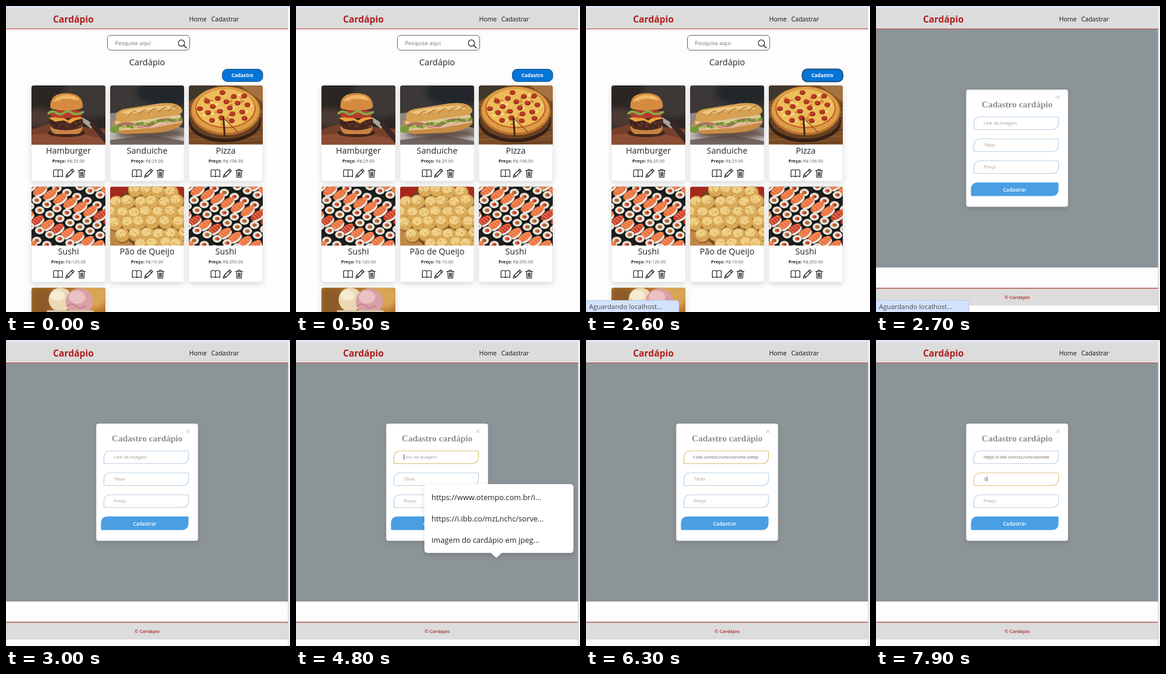
Recreate the animation shown at these times as an HTML page. Size 480 by 516 pixels, loop 8000 ms.

```html
<!DOCTYPE html>
<html lang="pt-BR">
<head>
<meta charset="utf-8">
<title>Cardápio</title>
<style>
  html, body { margin: 0; width: 480px; height: 516px; overflow: hidden; background: #fff; }
  svg { display: block; font-family: "Open Sans", "Noto Sans", sans-serif; }
  .mid { text-anchor: middle; }
  .form { font-family: "Liberation Sans", Arial, sans-serif; font-size: 8px; }
  .icon { fill: none; stroke: #111; stroke-width: 1.1; stroke-linejoin: round; stroke-linecap: round; }
</style>
</head>
<body>
<svg id="stage" width="480" height="516" viewBox="0 0 480 516"></svg>
<script>
const LOOP = 8000;
const stage = document.getElementById('stage');

const text = (x, y, size, fill, str, extra = '') =>
  `<text x="${x}" y="${y}" font-size="${size}" fill="${fill}" ${extra}>${str}</text>`;
const rect = (x, y, w, h, fill, extra = '') =>
  `<rect x="${x}" y="${y}" width="${w}" height="${h}" fill="${fill}" ${extra}/>`;
const oval = (x, y, rx, ry, fill, extra = '') =>
  `<ellipse cx="${x}" cy="${y}" rx="${rx}" ry="${ry}" fill="${fill}" ${extra}/>`;
const path = (d, fill, extra = '') => `<path d="${d}" fill="${fill}" ${extra}/>`;
const line = (d, color, width, extra = '') =>
  path(d, 'none', `stroke="${color}" stroke-width="${width}" stroke-linecap="round" ${extra}`);
const many = (n, fn) => Array.from({ length: n }, (_, i) => fn(i)).join('');

function seeded(seed) {
  return () => (seed = (seed * 16807) % 2147483647) / 2147483647;
}

// Photos, each 125 by 100
function burger() {
  const rnd = seeded(11);
  return rect(0, 0, 125, 100, '#2b2623')
    + oval(100, 20, 50, 35, '#3d3936', 'filter="url(#soft)"')
    + oval(12, 55, 30, 16, '#4b3b31', 'filter="url(#soft)"')
    + path('M0 74L30 65L125 73V100H0Z', '#75402b')
    + path('M0 84L60 76L125 91V100H0Z', '#8b4e35')
    + path('M86 54L97 60L104 68L101 73L84 60Z', '#aaa29c')
    + path('M98 65L106 61L125 84V98Z', '#392823')
    + oval(59, 80, 32, 7, '#42251b')
    + path('M32 66Q58 75 86 66Q88 80 77 82H41Q31 79 32 66Z', '#c88343')
    + path('M30 57Q57 50 87 57Q89 70 78 73Q58 78 38 73Q29 68 30 57Z', '#4b2720')
    + many(32, () => oval(32 + rnd() * 52, 59 + rnd() * 11, 1.5, 1, rnd() < .5 ? '#784534' : '#2e1713'))
    + path('M29 55L48 51L62 59L75 51L88 55L74 59L65 64L55 59L40 61Z', '#e6a23d')
    + path('M31 44Q58 38 86 44L84 53Q58 57 33 53Z', '#b63b2b')
    + line('M29 47Q35 41 42 46T55 46T68 46T87 45', '#85a748', 4)
    + path('M32 36Q31 13 59 13Q86 13 87 35Q87 42 59 42Q31 42 32 36Z', '#d58b3f')
    + path('M36 28Q43 16 60 16Q77 16 81 26Q60 18 36 28Z', '#edb666')
    + many(14, () => oval(42 + rnd() * 33, 17 + rnd() * 11, .9, .6, '#f9d696'));
}

function sandwich() {
  const rnd = seeded(23);
  return rect(0, 0, 125, 100, '#3b3837')
    + oval(95, 12, 52, 22, '#22262a', 'filter="url(#soft)"')
    + path('M0 47L28 44L125 72V100H0Z', '#8e8580')
    + path('M0 70L38 62L125 87V100H0Z', '#bbb7b5')
    + path('M0 92L70 83L125 94V100H0Z', '#716763')
    + oval(66, 82, 57, 8, '#5b4a3f', 'filter="url(#soft)"')
    + path('M5 66Q3 58 12 57L114 53Q125 57 122 64Q112 78 72 80L23 82Q10 80 5 66Z', '#c88b45')
    + path('M8 60Q52 55 119 49L121 62Q72 73 12 76Z', '#ddc795')
    + line('M12 68Q28 61 43 67T73 64T104 59L118 58', '#b26f63', 5)
    + line('M18 73Q40 66 55 70T91 65L112 62', '#e4aaa0', 2)
    + many(20, i => oval(5 + i * 5.9 + rnd() * 3, 69 - i * .75 + rnd() * 5, 3.5, 2.5, i % 3 ? '#718f37' : '#a2ba54'))
    + oval(7, 74, 8, 6, '#77983a')
    + path('M10 56Q7 42 28 39L85 30Q114 27 121 39Q125 46 114 50L26 62Q14 65 10 56Z', '#d6a153')
    + path('M18 45Q48 36 98 34Q112 36 109 40Q66 39 30 49Z', '#edc780')
    + many(5, i => line(`M${31 + i * 17} ${51 - i * 2}q6 -8 13 -8`, '#b77735', 1.4));
}

function pizza() {
  const rnd = seeded(31);
  return rect(0, 0, 125, 100, '#7a4b25')
    + path('M0 0H48L0 27Z', '#3e372a') + path('M86 0H125V28Z', '#a4723f')
    + many(8, i => line(`M0 ${32 + i * 10}L125 ${25 + i * 10}`, i % 2 ? '#5b351e' : '#93602f', 1.5))
    + oval(61, 62, 61, 34, '#352016') + oval(61, 57, 59, 33, '#674023')
    + oval(62, 43, 59, 41, '#b9702c') + oval(62, 41, 57, 39, '#dc9d47')
    + oval(62, 39, 51, 33, '#c45e27') + oval(62, 38, 49, 32, '#edbd59')
    + many(42, () => {
        const a = rnd() * 6.28, r = Math.sqrt(rnd());
        return oval(62 + r * Math.cos(a) * 46, 38 + r * Math.sin(a) * 29, 3, 2, rnd() < .5 ? '#f8dc88' : '#d98b3c');
      })
    + many(19, i => {
        const a = i * 2.4, r = Math.sqrt((i + .5) / 19);
        const x = 62 + r * Math.cos(a) * 45, y = 38 + r * Math.sin(a) * 29;
        return oval(x, y, 5, 4, '#8f2b1b') + oval(x - .5, y - .7, 4, 3, '#bd3b25');
      })
    + path('M57 53L59 85L62 84L60 53Z', '#432416')
    + line('M59 55L83 79', '#7a4422', 1.2);
}

function sushi() {
  const rnd = seeded(7);
  const maki = (x, y) => oval(x, y + 2, 9, 8, '#111816') + oval(x, y, 8, 6.4, '#e8e3db')
    + oval(x, y, 3.8, 3, '#d95e30') + oval(x + 1.5, y, 1.7, 2, rnd() < .5 ? '#687b35' : '#a9342a');
  const nigiri = (x, y) => `<g transform="translate(${x} ${y}) rotate(-34)">`
    + oval(0, 4, 12, 6, '#eee7dd') + oval(0, 0, 13, 6.3, rnd() < .3 ? '#c9412c' : '#ec7441')
    + many(4, i => line(`M${-8 + i * 5} -4q4 3 3 8`, '#f9b18b', .9)) + '</g>';
  const rows = many(11, row => many(9, col => {
    const x = col * 17 - 8 + (row % 2) * 5, y = row * 17 - 52 + col * 7;
    return row % 3 === 0 ? nigiri(x, y) : maki(x, y);
  }));
  return rect(0, 0, 125, 100, '#21201d') + rows;
}

function breads() {
  const rnd = seeded(5);
  const bread = (x, y) => oval(x + 1, y + 2, 12.5, 12, '#98622b') + oval(x, y, 12, 11.5, '#d9a957')
    + oval(x - 2, y - 3, 8.5, 7, '#efcf86')
    + many(5, () => oval(x - 7 + rnd() * 14, y - 6 + rnd() * 13, 1, .8, '#bd8035'));
  return rect(0, 0, 125, 100, '#70451f') + path('M0 0H35L0 35Z', '#a6271c')
    + path('M88 0H125V28Z', '#a92b1d') + path('M0 65L42 100H0Z', '#bd8948')
    + many(6, row => many(7, col => {
        const x = col * 21 - 3 + (row % 2) * 10 + rnd() * 5, y = row * 18 + 5 + rnd() * 5;
        return x + y < 32 || x - y > 103 || y - x > 66 ? '' : bread(x, y);
      }));
}

function iceCream() {
  return rect(0, 0, 125, 100, '#b5762e') + rect(0, 0, 34, 100, '#8b5a28', 'filter="url(#soft)"')
    + oval(103, 12, 28, 25, '#d8a552', 'filter="url(#soft)"')
    + oval(49, 20, 20, 20, '#ead9b4') + oval(44, 13, 12, 9, '#f6ecd2')
    + oval(81, 23, 23, 22, '#d9a0a5') + oval(77, 16, 14, 11, '#ebc2c4')
    + line('M60 31q8 -7 15 0t17 -1', '#c5838d', 2)
    + path('M26 38H105L96 100H35Z', '#d7c7ac');
}

const icons = `<g class="icon">
  <path d="M45 277v11M45 277q-4-2-7.5 0v11q4-2 7.5 0q4-2 7.5 0v-11q-4-2-7.5 0"/>
  <path d="M58 289l1.5-4.5l9.5-9.5l3 3l-9.5 9.5zM67 277l3 3M59.5 284.5l3 3"/>
  <path d="M79 277.5h12M80.5 277.5l.7 11.5h7.6l.7-11.5M83 277.5v-2h4v2M83.3 280v7M85 280v7M86.7 280v7"/>
</g>`;

function card(col, row, photo, title, price) {
  const x = 43 + col * 133, y = row * 170.5;
  return `<g transform="translate(${x} ${y})">`
    + rect(0, 134, 125, 161, '#fff', 'rx="4" stroke="#e2e2e2" stroke-width=".7" filter="url(#shade)"')
    + `<g transform="translate(0 134)" clip-path="url(#photoClip)">${photo}</g></g>`
    + `<g transform="translate(${x} ${Math.floor(y)})">`
    + text(62.5, 249, 14.2, '#212529', title, 'class="mid" font-weight="500"')
    + text(62.5, 264, 7.4, '#555', `<tspan font-weight="700" fill="#222">Preço:</tspan> R$:${price}`, 'class="mid"')
    + icons + '</g>';
}

// Leaf outline: round at top left and bottom right
const leaf = (x, y, w, h) =>
  `M${x + 12} ${y}H${x + w - 2}q2 0 2 2V${y + h - 12}q0 12 -12 12H${x + 2}q-2 0 -2 -2V${y + 12}q0 -12 12 -12Z`;

const field = (id, y, label) =>
  path(leaf(165.5, y, 143, 21.5), '#fff', `id="${id}" stroke="#b9d0e4" stroke-width="1.2"`)
  + text(182, y + 13.3, 8, '#a5a5a5', label, `id="${id}Hint" class="form"`);

const link = 'https://i.ibb.co/mzLnchc/sorvete.webp';
const suggestions = [
  'https://www.otempo.com.br/i...',
  'https://i.ibb.co/mzLnchc/sorve...',
  'imagem do cardápio em jpeg...'
];

stage.innerHTML = `<defs>
  <filter id="soft" x="-40%" y="-40%" width="180%" height="180%"><feGaussianBlur stdDeviation="5"/></filter>
  <filter id="shade" x="-20%" y="-20%" width="140%" height="140%">
    <feDropShadow dx="0" dy="3" stdDeviation="4" flood-color="#000" flood-opacity=".14"/></filter>
  <clipPath id="photoClip"><path d="M0 4q0-4 4-4H121q4 0 4 4V99.5H0Z"/></clipPath>
  <clipPath id="inputClip"><rect x="181" y="188" width="111.5" height="20"/></clipPath>
</defs>`
  + rect(0, 0, 480, 516, '#fdfdfd')
  + '<g id="menu">'
  + rect(171.5, 49.5, 139, 25, '#fff', 'rx="5.5" stroke="#666"')
  + text(184, 66, 9.4, '#757575', 'Pesquise aqui')
  + oval(296.5, 62.5, 5.3, 5.3, 'none', 'stroke="#222" stroke-width="1.2"')
  + line('M300.5 66.5l4.3 4.3', '#222', 1.6)
  + text(238.5, 100, 14.4, '#212529', 'Cardápio', 'class="mid" font-weight="500"')
  + rect(365.5, 106.5, 68.5, 21, '#0275d8', 'id="open" rx="8.5" stroke="#24507a"')
  + text(399.5, 120.3, 8.3, '#fff', 'Cadastro', 'class="mid" font-weight="700"')
  + card(0, 0, burger(), 'Hamburger', '25.00')
  + card(1, 0, sandwich(), 'Sanduiche', '25.00')
  + card(2, 0, pizza(), 'Pizza', '106.00')
  + card(0, 1, sushi(), 'Sushi', '120.00')
  + card(1, 1, breads(), 'Pão de Queijo', '10.00')
  + card(2, 1, sushi(), 'Sushi', '250.00')
  + card(0, 2, iceCream(), '', '')
  + '</g><g id="signup">'
  + rect(0, 39, 477, 402, '#8c9498')
  + rect(0, 475, 477, 30, '#dcdcdc') + rect(0, 475.3, 477, 1.4, '#b2504d')
  + text(238.5, 494, 7.8, '#b02222', '© Cardápio', 'class="mid" font-weight="600"')
  + rect(477, 4, 3, 512, '#f1f3f8') + rect(476.5, 39, 1, 477, '#c9ccd2')
  + rect(152.5, 141, 172, 197.5, '#fff', 'rx="4" filter="url(#shade)"')
  + line('M305 151.5l5 5m0-5l-5 5', '#aaa', .9)
  + text(238.5, 171, 15, '#8c9094', 'Cadastro cardápio',
      `class="mid" font-weight="700" style="font-family:'Liberation Serif',Times,serif"`)
  + field('image', 187, 'Link da imagem') + field('dish', 224, 'Titulo') + field('price', 261, 'Preço')
  + '<g clip-path="url(#inputClip)">' + text(182, 200.3, 8, '#777', link, 'id="url" class="form"') + '</g>'
  + text(182, 237.3, 8, '#777', 'S', 'id="typed" class="form"')
  + rect(0, 0, .8, 9, '#333', 'id="caret"')
  + path(leaf(160.5, 297.5, 148, 23), '#4a9fe3')
  + text(234.5, 312.5, 8.4, '#fff', 'Cadastrar', 'class="mid" font-weight="600"')
  + '<g id="popup">'
  + path('M223 243H463q6 0 6 6V353q0 6 -6 6H347.5L338.5 367.5L329.5 359H223q-6 0 -6 -6V249q0 -6 6 -6Z',
      '#fff', 'filter="url(#shade)"')
  + many(suggestions.length, i => text(229, 270 + i * 36, 12.7, '#222', suggestions[i]))
  + '</g></g>'
  + rect(0, 0, 480, 4, '#dfe5f2') + rect(0, 4, 477, 34.5, '#dcdcdc') + rect(0, 38, 477, 1.2, '#bd5551')
  + text(79.5, 28, 15.4, '#b01e1e', 'Cardápio', 'font-weight="700"')
  + text(309.5, 26, 10.5, '#111', 'Home') + text(347, 26, 10.3, '#111', 'Cadastrar')
  + '<g id="status">'
  + path('M-1 496.5H153q4 0 4 4V517H-1Z', '#d3e3fd', 'stroke="#b8c7df"')
  + text(5, 511, 11.3, '#474747', 'Aguardando localhost...') + '</g>';

const el = id => document.getElementById(id);
const show = (id, on) => el(id).setAttribute('visibility', on ? 'inherit' : 'hidden');
const set = (id, attrs) => Object.entries(attrs).forEach(([k, v]) => el(id).setAttribute(k, v));

function caretAt(t) {
  if (t < 4800) return null;
  if (t < 5800) return [182, 193];
  if (t < 6800) return [291.5, 193];
  return [t < 7900 ? 182 : 187.4, 230];
}

function render(now) {
  const t = Math.floor((now % LOOP) / 100) * 100;
  const filled = t >= 5800, next = t >= 6800;

  show('menu', t < 2700);
  show('signup', t >= 2700);
  show('status', t >= 2600 && t < 2900);
  set('open', { 'stroke-width': t >= 2600 ? 2 : 1 });

  const fade = filled ? Math.max(0, .6 - (t - 5800) / 250) : 1;
  const scale = .98 - Math.max(0, t - 5800) / 5000;
  show('popup', t >= 4800 && fade > 0);
  set('popup', {
    opacity: fade,
    transform: filled ? `translate(343 301) scale(${scale}) translate(-343 -301)` : ''
  });

  show('imageHint', !filled);
  show('url', filled);
  set('url', next ? { x: 182, 'text-anchor': 'start' } : { x: 291.5, 'text-anchor': 'end' });
  show('dishHint', t < 7900);
  show('typed', t >= 7900);
  set('image', { stroke: t >= 4800 && !next ? '#d8bd72' : '#b9d0e4' });
  set('dish', { stroke: next ? '#e0c284' : '#b9d0e4' });

  const caret = caretAt(t);
  show('caret', caret && (t - 4800) % 1000 < 500);
  if (caret) set('caret', { x: caret[0], y: caret[1] });
}

const start = performance.now();
function tick() {
  render(performance.now() - start);
  requestAnimationFrame(tick);
}
tick();
</script>
</body>
</html>
```
